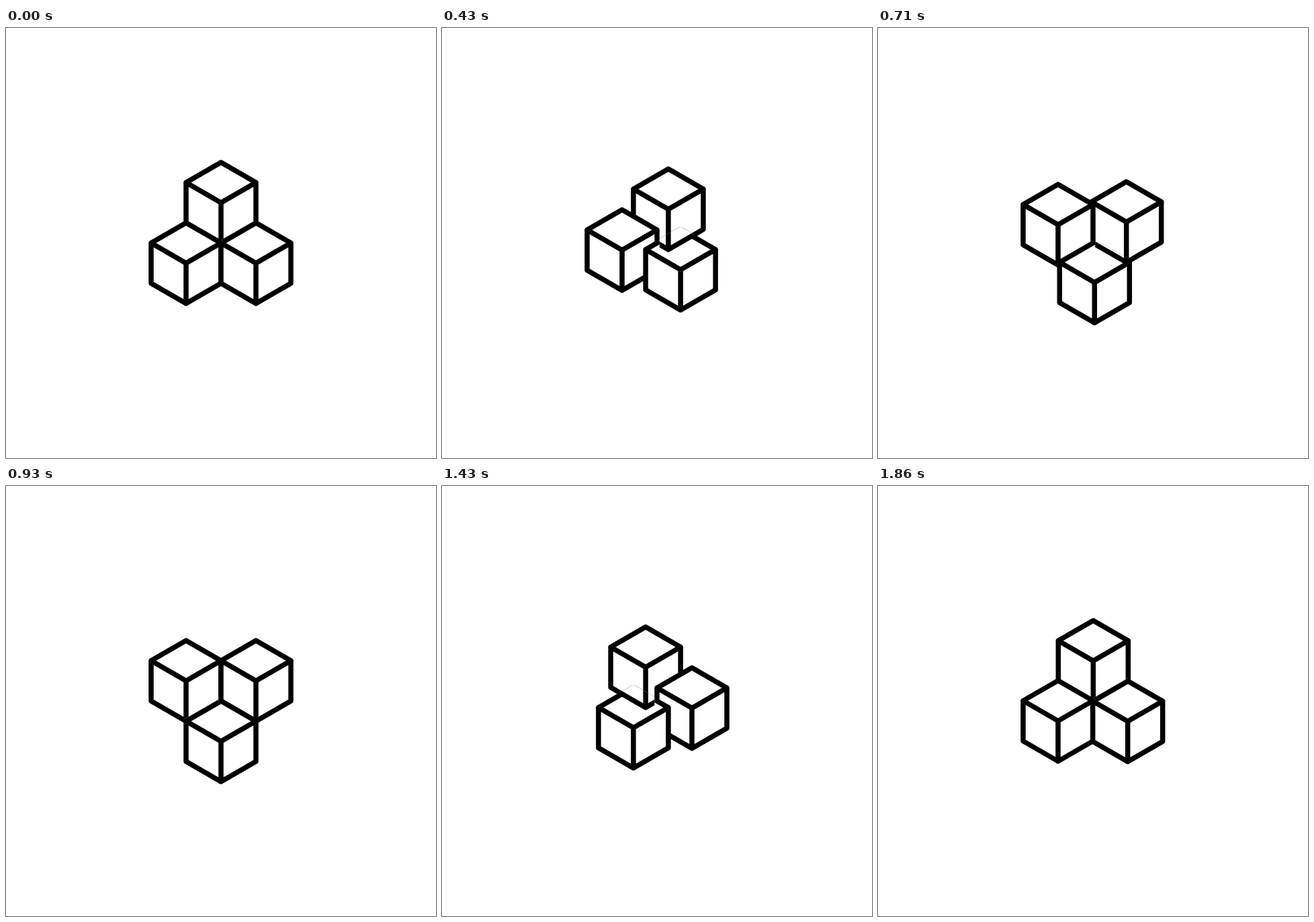
An HTML page with a canvas for the animation above (1930 ms loop, 640 by 640 pixels).

```html
<!DOCTYPE html>
<html lang="en">
<head>
<meta charset="utf-8">
<title>Cubes</title>
<style>
  html, body { margin: 0; width: 100%; height: 100%; overflow: hidden; background: #fff; }
  canvas { display: block; width: 640px; height: 640px; }
</style>
</head>
<body>
<canvas id="stage" width="640" height="640"></canvas>
<script>
const ctx = document.getElementById('stage').getContext('2d');
const LOOP = 1930, STEPS = 27;
const W = 52, H = 30, LINE = 7.5;

// [step, progress]: 0 to 1 shifts clockwise, 1 to 2 shifts on to the start pose
const KEYS = [
  [0, 0], [2, 0.034], [4, 0.103], [6, 0.325], [8, 0.85], [10, 0.956], [13, 1],
  [16, 1.04], [17, 1.068], [18, 1.15], [20, 1.675], [22, 1.899], [24, 1.967],
  [25.6, 2], [27, 2.02]
];

const secant = i => (KEYS[i + 1][1] - KEYS[i][1]) / (KEYS[i + 1][0] - KEYS[i][0]);

// Harmonic mean of neighbouring slopes keeps the curve monotone
function slope(i) {
  if (i === 0) return secant(0);
  if (i === KEYS.length - 1) return secant(i - 1);
  const a = secant(i - 1), b = secant(i);
  return 2 * a * b / (a + b);
}

function progress(x) {
  let i = 0;
  while (i < KEYS.length - 2 && x >= KEYS[i + 1][0]) i++;
  const [x0, y0] = KEYS[i], [x1, y1] = KEYS[i + 1];
  const d = x1 - x0, u = (x - x0) / d, v = 1 - u;
  return y0 * v * v * (1 + 2 * u) + y1 * u * u * (3 - 2 * u)
    + d * u * v * (slope(i) * v - slope(i + 1) * u);
}

function hexagon([x, y], grow = 0) {
  const k = 1 + grow / W, w = W * k, h = H * k;
  ctx.moveTo(x, y - 2 * h);
  ctx.lineTo(x + w, y - h);
  ctx.lineTo(x + w, y + h);
  ctx.lineTo(x, y + 2 * h);
  ctx.lineTo(x - w, y + h);
  ctx.lineTo(x - w, y - h);
  ctx.closePath();
}

function cube(c) {
  const [x, y] = c;
  ctx.beginPath();
  hexagon(c);
  ctx.fill();
  ctx.moveTo(x - W, y - H);
  ctx.lineTo(x, y);
  ctx.lineTo(x + W, y - H);
  ctx.moveTo(x, y);
  ctx.lineTo(x, y + 2 * H);
  ctx.stroke();
}

// Each cube overlaps the next in a ring: left > top > right > left
function cluster(p) {
  const top = [W * p, -60 + H * p];
  const left = [-W, H - 60 * p];
  const right = [W - W * p, H + H * p];
  cube(top);
  cube(left);
  cube(right);

  ctx.save();
  ctx.beginPath();
  hexagon(right, LINE / 2);
  ctx.clip();
  ctx.beginPath();
  ctx.rect(-320, -320, 640, 640);
  hexagon(left, LINE / 2);
  ctx.clip('evenodd');
  cube(top);
  ctx.restore();
}

function draw(ms) {
  const step = Math.min(STEPS - 1, Math.floor(ms / LOOP * STEPS + 0.1));
  const w = progress(step);
  const back = w >= 1 && w < 2;

  ctx.setTransform(1, 0, 0, 1, 0, 0);
  ctx.fillStyle = '#fff';
  ctx.fillRect(0, 0, 640, 640);
  ctx.strokeStyle = '#000';
  ctx.lineWidth = LINE;
  ctx.lineJoin = ctx.lineCap = 'round';
  // The second half is the first one mirrored and reversed
  ctx.setTransform(back ? -1 : 1, 0, 0, 1, 320, 320);
  cluster(back ? 2 - w : w % 2);
}

const start = performance.now();
function tick() {
  draw((performance.now() - start) % LOOP);
  requestAnimationFrame(tick);
}
tick();
</script>
</body>
</html>
```
